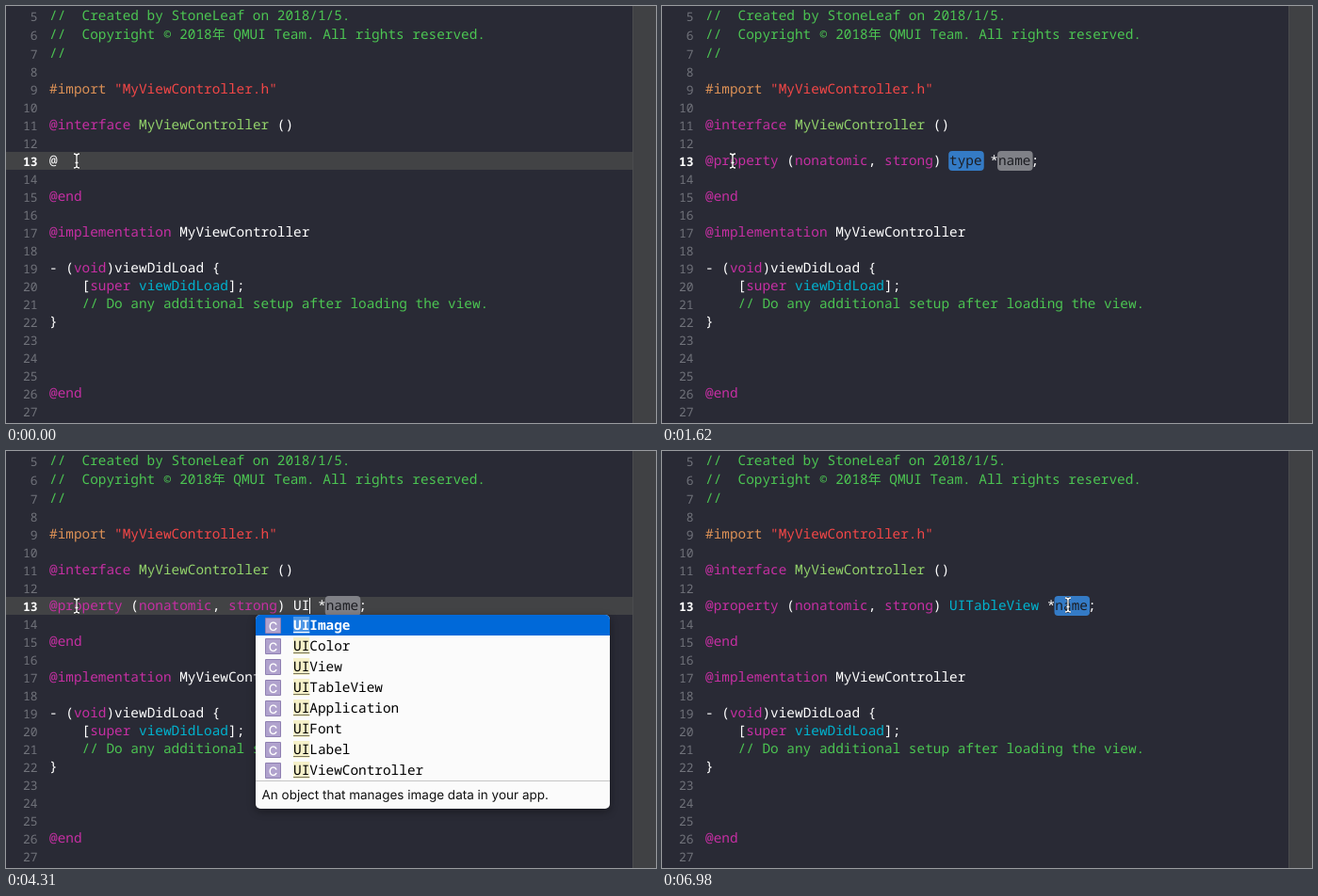
An HTML page for the animation above (8000 ms loop, 690x443 px).

```html
<!DOCTYPE html>
<html lang="en">
<head>
<meta charset="utf-8">
<title>Code completion</title>
<style>
html, body { margin: 0; width: 100%; height: 100%; overflow: hidden; background: #292a35; }
svg { display: block; width: 690px; height: 443px; }
text { white-space: pre; font: 500 14.4px "Noto Sans Mono", "Noto Sans CJK SC", "Noto Sans CJK", monospace;
  text-rendering: geometricPrecision; fill: #fff; }
.num { font-size: 13px; text-anchor: end; fill: #70727a; }
.now { font-weight: 600; fill: #fff; }
.com { fill: #4cc552; }
.key { fill: #c62fa3; }
.str { fill: #f24747; }
.pre { fill: #dc9156; }
.own { fill: #93d36b; }
.sys { fill: #00b3cf; }
.tok { fill: #1c1d22; }
.cjk { font-size: 14px; }
.item { fill: #000; }
.sel { fill: #fff; font-weight: 600; }
.note { font: 400 13.5px Inter, sans-serif; fill: #111; }
.icon { font: 500 13px Inter, sans-serif; text-anchor: middle; }
.brace { font: 600 9px Inter, sans-serif; text-anchor: middle; }
.popup { filter: drop-shadow(0 3px 4px rgba(0, 0, 0, .38)); }
</style>
</head>
<body>
<svg id="stage" viewBox="0 0 690 443"></svg>
<script>
const LOOP = 8000, CHAR = 8.64, LEFT = 46, TYPE_COL = 30;
const stage = document.getElementById('stage');
const col = n => LEFT + n * CHAR;
const baseline = n => n < 7 ? 35 + 20 * (n - 6) : 93 + 19 * (n - 9);
const rect = (x, y, w, h, fill, rx = 0) =>
  `<rect x="${x}" y="${y}" width="${w}" height="${h}" rx="${rx}" fill="${fill}"/>`;
const label = (x, y, s, cls = '') => `<text x="${x}" y="${y}" class="${cls}">${s}</text>`;
const span = (cls, s) => `<tspan class="${cls}">${s}</tspan>`;

const code = {
  5: span('com', '//  Created by StoneLeaf on 2018/1/5.'),
  6: span('com', '//  Copyright © 2018' + span('cjk', '年') + ' QMUI Team. All rights reserved.'),
  7: span('com', '//'),
  9: span('pre', '#import ') + span('str', '"MyViewController.h"'),
  11: span('key', '@interface') + ' ' + span('own', 'MyViewController') + ' ()',
  15: span('key', '@end'),
  17: span('key', '@implementation') + ' MyViewController',
  19: '- (' + span('key', 'void') + ')viewDidLoad {',
  20: '    [' + span('key', 'super') + ' ' + span('sys', 'viewDidLoad') + '];',
  21: span('com', '    // Do any additional setup after loading the view.'),
  22: '}',
  26: span('key', '@end')
};

const snippets = ['@pa – Property Assign', '@pb – Property Block', '@pc – Property Copy',
  '@pr – Property Readonly', '@prw – Property Readwrite', '@ps – Property Strong',
  '@pw – Property Weak', '@warn – Warning qvo'];
const classes = {
  UI: ['Image', 'Color', 'View', 'TableView', 'Application', 'Font', 'Label', 'ViewController'],
  UIT: ['ableView', 'ableViewCell', 'ouch', 'abBar', 'oolbar', 'extView', 'extField', 'extRange']
};
const notes = {
  image: ['An object that manages image data in your app.'],
  table: ['A view that presents data using rows arranged in a', 'single column.']
};

function sceneAt(t) {
  const s = { bar: true, mouse: [75, 164.5] };
  if (t < 1470) {
    if (t >= 150) s.snippet = [740, 890, 1030, 1180, 1330].filter(x => t >= x).length;
    return s;
  }
  if (t < 3120) return { ...s, type: 'type', select: 'type', bar: false };
  if (t < 5660) {
    s.type = t < 3260 ? 'U' : t < 4910 ? 'UI' : 'UIt';
    s.caret = t < 3860 || t >= 4310;
    if (t >= 3410) {
      s.prefix = t < 5060 ? 'UI' : 'UIT';
      s.note = t < 5360 ? 'image' : 'table';
    }
    return s;
  }
  s.type = 'UITableView';
  s.caret = true;
  if (t >= 5950) {
    const k = Math.min(1, (Math.floor((t - 5950) / 147) + 1) / 7);
    const p = k * k * (3 - 2 * k);
    s.mouse = [75 + 356 * p, 164.5 - p - 12 * Math.sin(Math.PI * p)];
  }
  if (t >= 6980) Object.assign(s, { bar: false, caret: false, select: 'name' });
  return s;
}

function token(c, word, selected) {
  return rect(col(c) - 1, 154, word.length * CHAR + 3, 21, selected ? '#347bc6' : '#808187', 4);
}

function propertyLine(s) {
  if (!s.type) return label(LEFT, baseline(13), '@');
  const nameCol = TYPE_COL + s.type.length + 2;
  const typeClass = s.select === 'type' ? 'tok' : s.type === 'UITableView' ? 'sys' : '';
  return (s.select === 'type' ? token(TYPE_COL, s.type, true) : '') +
    token(nameCol, 'name', s.select === 'name') +
    label(LEFT, baseline(13), span('key', '@property') + ' (' + span('key', 'nonatomic') + ', ' +
      span('key', 'strong') + ') ' + span(typeClass, s.type) + ' *' + span('tok', 'name') + ';') +
    (s.caret ? rect(Math.round(col(nameCol - 2)), 156, 1, 17, '#fff') : '');
}

function popup(x, height, selected, row) {
  const top = 174 + 22 * selected;
  let out = `<g class="popup">${rect(x, 174, 376, height, '#fbfbfb', 5)}</g>`;
  out += selected ? rect(x, top, 376, 22, '#0069d9')
    : rect(x, 174, 376, 22, '#0069d9', 5) + rect(x, 180, 376, 16, '#0069d9');
  for (let i = 0; i < 8; i++) out += row(174 + 22 * i, i, i === selected);
  return out;
}

function snippetPopup(selected) {
  return popup(13, 176, selected, (y, i, on) =>
    rect(23, y + 3, 17, 17, '#b4b4b4', 1) + rect(24, y + 4, 15, 15, '#c5c5c5') +
    label(31.5, y + 14.5, '{ }', 'brace') +
    label(53, y + 16, snippets[i], on ? 'sel' : 'item'));
}

function classPopup(prefix, note) {
  const w = prefix.length * CHAR, lines = notes[note];
  return popup(265, 188 + 18 * lines.length, 0, (y, i, on) =>
    rect(275, y + 3, 17, 17, '#8f80b2', 1) + rect(276, y + 4, 15, 15, '#b0a2cd') +
    label(283.5, y + 16.5, 'C', 'icon') +
    rect(305, y + 2, w, 18, on ? '#4f97e5' : '#f6f1c9') +
    rect(305, y + 18, w, 1, on ? '#fff' : '#77745c') +
    label(305, y + 16, prefix + classes[prefix][i], on ? 'sel' : 'item')) +
    rect(265, 350, 376, 1, '#c6c6c6') +
    lines.map((s, i) => label(271.5, 370 + 18.5 * i, s, 'note')).join('');
}

function pointer([x, y]) {
  const d = `M${x - 3} ${y - 7.5}q3 0 3 2.5q0 -2.5 3 -2.5M${x} ${y - 5}v10` +
    `M${x - 3} ${y + 7.5}q3 0 3 -2.5q0 2.5 3 2.5M${x - 1.5} ${y + 2}h3`;
  return `<path d="${d}" fill="none" stroke="#222" stroke-width="2.6"/>` +
    `<path d="${d}" fill="none" stroke="#fff" stroke-width="1.3"/>`;
}

let listing = '';
for (let n = 5; n <= 27; n++) {
  listing += label(33.5, baseline(n) + .6, n, n === 13 ? 'num now' : 'num');
  if (code[n]) listing += label(LEFT, baseline(n), code[n]);
}

function draw(s) {
  stage.innerHTML = rect(0, 0, 690, 443, '#292a35') +
    (s.bar ? rect(0, 155, 666, 19, '#424345') : '') +
    rect(665, 0, 25, 443, '#404144') + rect(665, 0, 1, 443, '#4a4b4e') +
    listing + propertyLine(s) +
    (s.snippet >= 0 ? snippetPopup(s.snippet) : '') +
    (s.prefix ? classPopup(s.prefix, s.note) : '') +
    pointer(s.mouse);
}

let shown;
function tick() {
  const scene = sceneAt(performance.now() % LOOP), key = JSON.stringify(scene);
  if (key !== shown) draw(scene);
  shown = key;
  requestAnimationFrame(tick);
}
tick();
</script>
</body>
</html>
```
